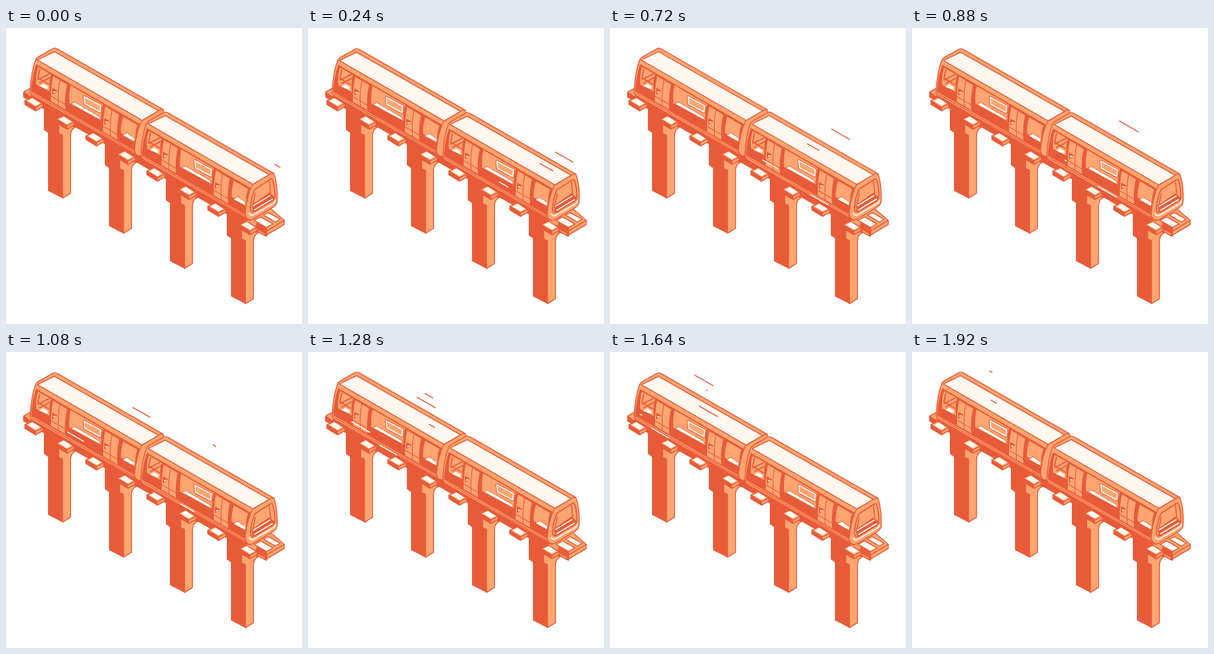
These frames come from a looping animation (500 px wide and 500 px high, 1960 ms). An HTML page:

```html
<!DOCTYPE html>
<html>
<head>
<meta charset="utf-8">
<style>
html, body { margin: 0; width: 100%; height: 100%; overflow: hidden; background: #fff }
svg { display: block; width: 100vw; height: 100vh }
path { stroke-linejoin: round; stroke-linecap: round }
.d { fill: #e85b39 }
.m { fill: #ffa56f }
.l { fill: #fff8f1 }
.o { stroke: #e85b39; stroke-width: 1.6 }
.n { fill: none }
.lm { fill: none; stroke: #ffa56f; stroke-width: 1.4 }
.ll { stroke: #fff8f1; stroke-width: 2 }
</style>
</head>
<body>
<svg viewBox="0 0 500 500">
<defs>
  <g id="pillar">
    <path class="d" d="M64 134L90 148L96 164V288L71 275V177L64 172Z"/>
    <path class="m o" d="M89 163L118 167Q109 171 109 182V279L95.500 287.500V181L89 178Z"/>
    <path class="d" d="M114 150L132 160V175L128 172V169L117 163V168L114 166Z"/>
  </g>
  <g id="tray">
    <path class="d o" d="M-15 -4L3 7L15 1V6L3 13L-15 2Z"/>
    <path class="m" d="M3.500 7.500L14.500 1.500V5.500L3.500 11.500Z"/>
    <path class="m o" d="M-15 -4L-3 -10L15 1L3 7Z"/>
    <path class="l" d="M-11 -4L-2 -8.500L11 0L3 4.500Z"/>
  </g>
  <g id="door">
    <path class="m o" d="M79 80L104 95Q99 116 101 139L75 124Q75 98 79 80Z"/>
    <path class="n o" d="M91 88Q87 106 88.500 131M76 115L100 129" style="stroke-width:1.300"/>
    <path class="d" d="M78 101L87 106L78 113Z"/>
    <path class="l" d="M80 107L85 107L80 110Z"/>
  </g>
  <g id="car">
    <path class="m o" d="M50 54Q51 51 56 48L78 35.500Q82 32.500 87 35.500L266 138L234 158L225 217L46 115Q40 112 41 103Q43 72 50 54Z"/>
    <path class="d" d="M51 61L231 165L223 214L46 112Q41 108 43 99Q45 78 51 61Z"/>
    <path class="lm" d="M45 109L222 211"/>
    <path class="l o" d="M53 54L82 40L258 140L230 156Z"/>

    <path class="m" d="M54 66L76 78Q72 92 74 107L51 95Q50 78 54 66Z"/>
    <path class="n o" d="M57 70L54 84L72 95M54 87L74 77M57 93L74 84" style="stroke-width:2"/>
    <path class="l" d="M56 98L63 94L71 99L70 104Z"/>

    <use href="#door"/>
    <use href="#door" x="88" y="51"/>

    <path class="m" d="M109 97L164 129Q160 144 161 156L107 127Q106 110 109 97Z"/>
    <path class="l o" d="M110 128L116 125L159 150L159 155Z" style="stroke-width:1"/>
    <path class="n o" d="M132 116L160 131L159 142L133 128Z" style="stroke-width:4.500"/>
    <path class="m ll" d="M132 116L160 131L159 142L133 128Z"/>

    <path class="m" d="M198 150L222 164Q217 176 219 191L194 177Q194 162 198 150Z"/>
    <path class="l o" d="M197 181L204 177L218 186L217 192Z" style="stroke-width:1"/>

    <path class="m o" d="M229 157L259 139Q265 135 267 142Q272 160 271 183Q271 190 265 194L230 215Q219 219 217 206Q219 178 229 157Z"/>
  </g>
  <g id="windscreen">
    <path class="m o" d="M421 272L446 256Q450 253 451 259Q455 272 454 287L450 292L420 310Q413 313 413 304Q414 285 421 272Z" style="stroke-width:2"/>
    <path class="d" d="M415 299L445 278L454 286L449 293L417 311Z"/>
    <path class="n o" d="M421 279L417 298M445 259L447 279" style="stroke-width:1.800"/>
    <path class="n ll" d="M418 300L446 283M420 307L450 289"/>
    <path class="n ll" d="M411 313Q413 318 419 315L452 296Q455 294 455 291"/>
  </g>
</defs>

<path class="d" d="M29 109L41 102L405 312L422 338L418 312L438 345V352L405 333L29 117Z"/>
<path class="m o" d="M30 108L41 102L44 114L40 116Z"/>
<path class="m o" d="M405 326L445 303L470 325V332L438 351L422 342Z"/>
<path class="n o" d="M421 334L438 344L470 325M438 344V351"/>
<path class="l o" d="M419 325L430 319L451 331L440 337ZM435 316L443 312L463 323L455 328Z"/>
<g id="track"></g>
<g id="train">
  <use href="#car"/>
  <use href="#car" x="187" y="108"/>
  <use href="#windscreen"/>
</g>
<g id="streaks"></g>
</svg>
<script>
const $ = id => document.getElementById(id);
const DARK = '#e85b39', LIGHT = '#fff8f1';
const LOOP = 1960, STEP = 40, LIFE = 760, REACH = 80, SLOPE = .57;

let parts = '';
for (let i = 0; i < 4; i++) {
  const x = 103 * i, y = 59.4 * i;
  parts += `<use href="#pillar" x="${x}" y="${y}"/>
    <use href="#tray" x="${x + 47}" y="${y + 127}"/>
    <use href="#tray" x="${x + 100}" y="${y + 158}"/>`;
}
$('track').innerHTML = parts;

// Each lane sends out two streaks, given by where and when they start
const lanes = [
  { color: DARK, y: -28.5, starts: [[463, -60], [243, 890]] },
  { color: DARK, y: -42.5, starts: [[430, 350], [211, 1190]] },
  { color: DARK, y: 5.5, starts: [[414, 95], [214, 1220]] },
  { color: LIGHT, y: 76, starts: [[338, 140], [131, 900]] },
  { color: LIGHT, y: 88.5, starts: [[375, 480], [150, 1090]] }
];

const streaks = lanes.flatMap(({ color, y, starts }) => starts.map(([x, begin]) => {
  const path = document.createElementNS('http://www.w3.org/2000/svg', 'path');
  path.setAttribute('stroke', color);
  path.setAttribute('stroke-width', 1.7);
  $('streaks').append(path);
  return { path, x, y, begin };
}));

// The head arrives early, the tail leaves late
function drawStreak({ path, x, y, begin }, t) {
  const p = (t - begin) / LIFE;
  const head = x - REACH * Math.min(1, p / .7);
  const tail = x - REACH * Math.max(0, (p - .25) / .75);
  const point = px => `${px} ${y + SLOPE * px}`;
  path.setAttribute('d', p > 0 && p < 1 ? `M${point(head)}L${point(tail)}` : '');
}

function draw(now) {
  const t = Math.floor(now % LOOP / STEP) * STEP;
  const bob = .6 * (1 - Math.cos(t / LOOP * 6 * Math.PI));
  $('train').setAttribute('transform', `translate(0 ${bob.toFixed(2)})`);
  streaks.forEach(s => drawStreak(s, t));
}

const start = performance.now();
function frame() {
  draw(performance.now() - start);
  requestAnimationFrame(frame);
}
frame();
</script>
</body>
</html>
```
